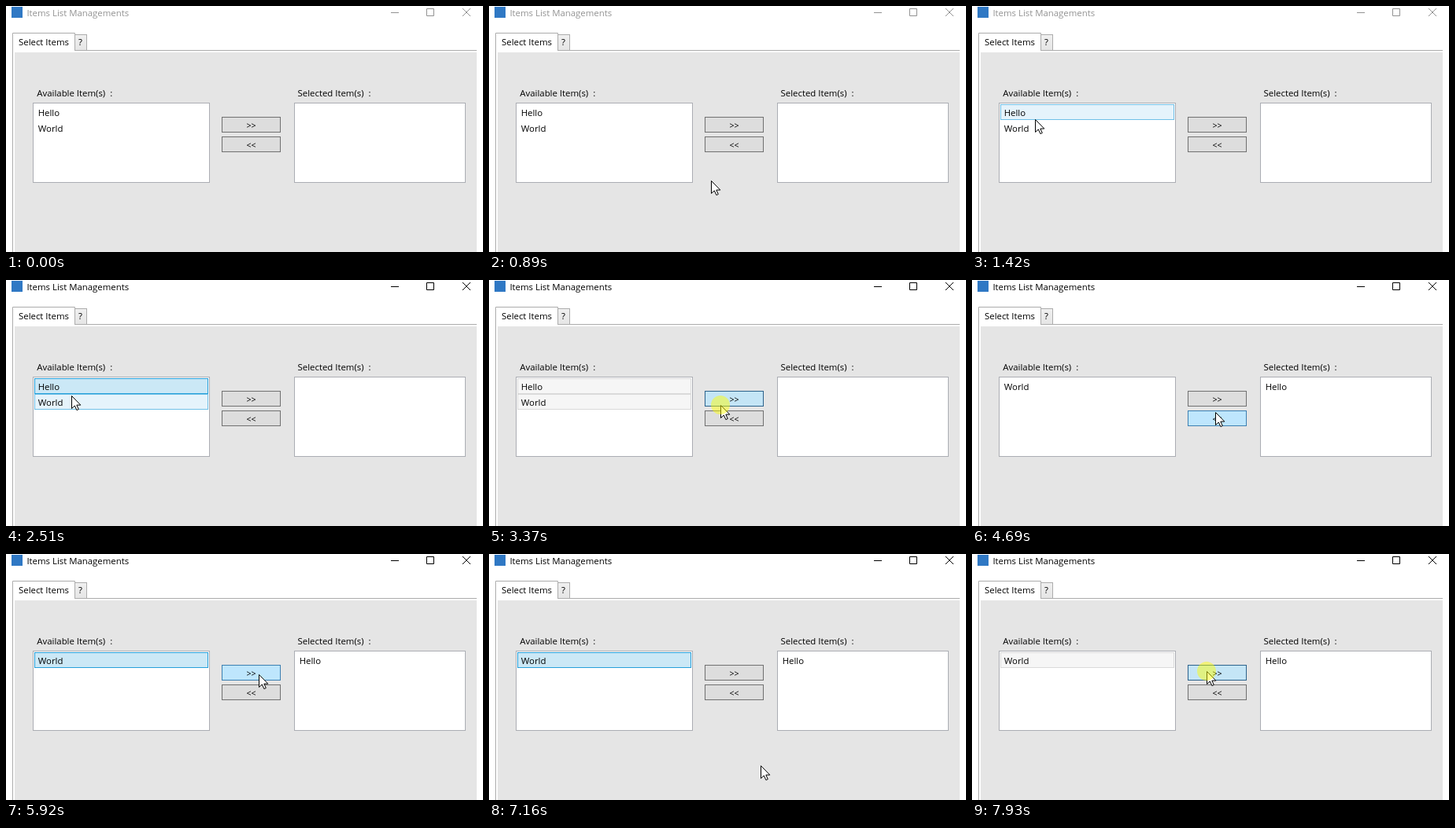
Write an HTML page that moves like this. It is 606 px wide and 313 px high and loops after 8 s.

```html
<!DOCTYPE html>
<html lang="en">
<head>
<meta charset="utf-8">
<title>Items List Managements</title>
<style>
  html, body { margin: 0; width: 100%; height: 100%; overflow: hidden; background: #fff; }
  svg { display: block; width: 100vw; height: 100vh; }
  text { font: 11.4px "Open Sans", "Noto Sans", sans-serif; fill: #000; white-space: pre; }
  .line { fill: none; stroke: #acacac; }
  .list { fill: #fff; stroke: #abadb3; }
  .label { font-size: 10.6px; text-anchor: middle; }
  .button { fill: #ddd; stroke: #707070; }
  .button.hover { fill: #bee6fd; stroke: #3c7fb1; }
  .button.pressed { fill: #c4e5f6; stroke: #2c628b; }
  .row.hover { fill: #e5f3fb; stroke: #70c0e7; }
  .row.selected { fill: #cbe8f6; stroke: #26a0da; }
  .row.inactive { fill: #f6f6f6; stroke: #dadada; }
  #caption text { fill: currentColor; }
  #caption path { fill: none; stroke: currentColor; }
</style>
</head>
<body>
<svg viewBox="0 0 606 313" preserveAspectRatio="none">
  <defs>
    <linearGradient id="tab" x2="0" y2="1">
      <stop stop-color="#f0f0f0"/><stop offset="1" stop-color="#e5e5e5"/>
    </linearGradient>
  </defs>
  <rect width="606" height="313" fill="#fff"/>
  <rect x="7" y="1" width="14" height="14" fill="#2f78c4"/>
  <g id="caption">
    <text x="26.4" y="13">Items List Managements</text>
    <path d="M489 8.5H499M534.5 3.5H543.5V12.5H534.5ZM580 3L590 13M590 3L580 13"/>
  </g>
  <rect x="11" y="59" width="587" height="254" fill="#e5e5e5"/>
  <rect x="87.5" y="36.5" width="15" height="20" fill="url(#tab)" stroke="#acacac"/>
  <path class="line" d="M8.5 313V34.5H87.5V56.5H598"/>
  <text x="16" y="50">Select Items</text>
  <text x="92" y="50">?</text>
  <text x="39.3" y="115">Available Item(s)  :</text>
  <text x="370.6" y="115">Selected Item(s)  :</text>
  <rect class="list" x="34.5" y="123.5" width="224" height="101"/>
  <rect class="list" x="366.5" y="123.5" width="217" height="101"/>
  <g id="view"></g>
  <path id="cursor" d="M.5 .5V16.5L4.3 13 6.9 18.6 9.3 17.5 6.8 12.1H11.8Z" fill="#fff" stroke="#000"/>
  <circle id="click" r="12" fill="#ff0" fill-opacity=".47"/>
</svg>
<script>
const LOOP = 8000, TICK = 77, HOLD = 75;
const $ = id => document.getElementById(id);

// Pointer moves: start, end, where to
const moves = [
  [270, 270, 431, 289], [350, 350, 403, 269], [580, 1420, 80, 144],
  [1900, 1900, 83, 147], [2970, 3290, 294, 159], [3520, 3750, 405, 157],
  [4070, 4220, 309, 176], [4620, 4690, 309, 168], [4770, 5230, 184, 141],
  [5610, 5920, 321, 153], [7010, 7240, 349, 291], [7390, 7470, 432, 295],
  [7550, 7850, 298, 149]
];
const clicks = [1500, 2740, 3370, 3920, 4390, 5230, 7930];

const ease = k => k * k * (3 - 2 * k);
const inside = (p, b) => p && p.x >= b.x && p.x < b.x + b.w && p.y >= b.y && p.y < b.y + 20;

// The pointer advances one eased step per tick
function pointer(t) {
  let from = null;
  for (const [start, end, x, y] of moves) {
    if (t < start) break;
    const steps = Math.round((end - start) / TICK) + 1;
    const step = Math.floor((t - start) / TICK + 0.15) + 1;
    const k = ease(Math.min(1, step / steps));
    const mix = (a, b) => Math.round(a + (b - a) * k);
    from = from ? { x: mix(from.x, x), y: mix(from.y, y) } : { x, y };
  }
  return from;
}

const rowBox = (list, i) => ({ x: list.x, y: 125 + 20 * i, w: list.w });

// Replays every click so far on fresh lists
function replay(t) {
  const left = { x: 36, w: 221, items: [{ name: 'Hello' }, { name: 'World' }] };
  const right = { x: 368, w: 214, items: [] };
  const buttons = [
    { x: 274, y: 141, w: 75, label: '&gt;&gt;', from: left, to: right },
    { x: 274, y: 166, w: 75, label: '&lt;&lt;', from: right, to: left }
  ];
  const state = { lists: [left, right], buttons, focus: true, down: false };
  for (const time of clicks) {
    if (t < time) break;
    const p = pointer(time);
    state.down = t < time + HOLD;
    for (const list of state.lists) {
      const hit = list.items.find((_, i) => inside(p, rowBox(list, i)));
      if (hit) hit.selected = state.focus = true;
    }
    const pressed = buttons.find(b => inside(p, b));
    if (!pressed) continue;
    state.focus = false;
    if (state.down) continue;
    const { from, to } = pressed;
    to.items.push(...from.items.filter(i => i.selected).map(({ name }) => ({ name })));
    from.items = from.items.filter(i => !i.selected);
  }
  return state;
}

const frame = (kind, b) =>
  `<rect class="${kind}" x="${b.x + .5}" y="${b.y + .5}" width="${b.w - 1}" height="19"/>`;

function drawRow(item, box, focus, p) {
  const kind = item.selected ? (focus ? 'selected' : 'inactive') : inside(p, box) ? 'hover' : '';
  return (kind && frame('row ' + kind, box)) +
    `<text x="${box.x + 4.7}" y="${box.y + 15}">${item.name}</text>`;
}

function drawButton(b, down, p) {
  const kind = inside(p, b) ? (down ? 'pressed' : 'hover') : '';
  return frame('button ' + kind, b) + `<text class="label" x="311.5" y="${b.y + 15}">${b.label}</text>`;
}

let shown = '';
function draw(t) {
  const p = pointer(t);
  const { lists, buttons, focus, down } = replay(t);
  const html = lists.flatMap(l => l.items.map((item, i) => drawRow(item, rowBox(l, i), focus, p)))
    .concat(buttons.map(b => drawButton(b, down, p))).join('');
  if (html !== shown) $('view').innerHTML = shown = html;

  $('caption').style.color = t < clicks[0] ? '#929292' : '#000';
  $('cursor').style.display = p ? '' : 'none';
  $('click').style.display = down ? '' : 'none';
  if (p) for (const id of ['cursor', 'click']) $(id).setAttribute('transform', `translate(${p.x} ${p.y})`);
}

const begin = performance.now();
function tick() {
  draw((performance.now() - begin) % LOOP);
  requestAnimationFrame(tick);
}
tick();
</script>
</body>
</html>
```
